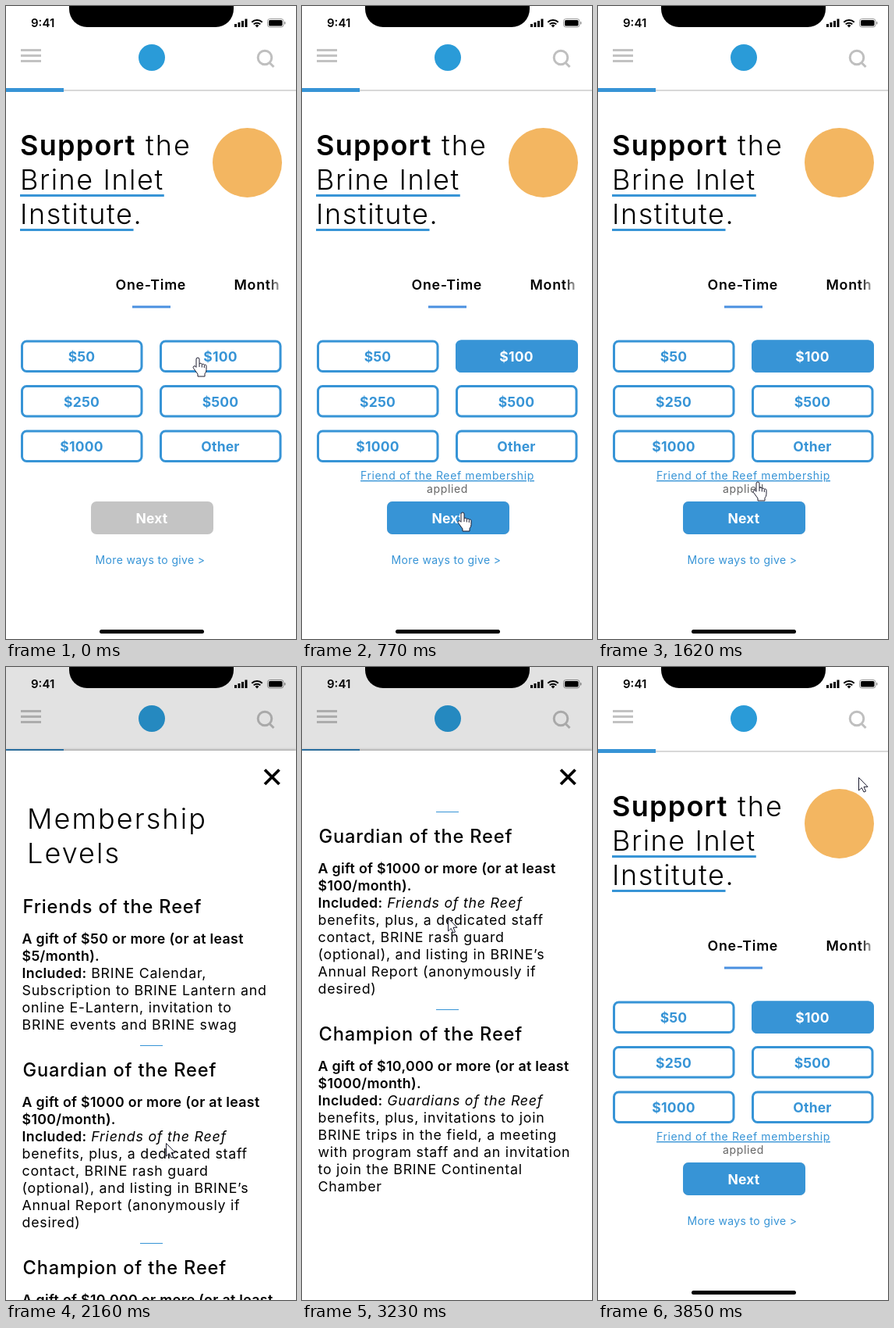
An HTML page that plays this animation: 372 px wide and 810 px high, repeating every 3930 ms.

```html
<!DOCTYPE html>
<html lang="en">
<head>
<meta charset="utf-8">
<title>Donation flow</title>
<style>
  :root { --blue: #3794d6; }
  html, body { margin: 0; width: 100%; height: 100%; overflow: hidden; background: #fff; }
  body { position: relative; font-family: Inter, "Open Sans", sans-serif; color: #000; }
  svg, .modal, .dim, .title { position: absolute; left: 0; top: 0; }
  svg { width: 372px; height: 810px; font-family: inherit; }

  h1 { margin: 0; font: 300 36px/44px Inter, "Open Sans", sans-serif; letter-spacing: .058em; white-space: pre; }
  h1 b { font-weight: 600; letter-spacing: .035em; }
  h1 u { letter-spacing: .043em; text-decoration: underline 3px var(--blue); text-underline-offset: 6px; text-decoration-skip-ink: none; }
  .title { left: 18px; top: 156px; }

  .tab { font-size: 17.8px; font-weight: 600; letter-spacing: .04em; }
  .label { font-size: 17.5px; font-weight: 700; letter-spacing: .01em; text-anchor: middle; fill: var(--blue); }
  .small { font-size: 14px; letter-spacing: .045em; text-anchor: middle; }
  .box { fill: #fff; stroke: var(--blue); stroke-width: 3; }
  .fill { fill: var(--blue); }
  .white { fill: #fff; }

  .dim { width: 372px; height: 107px; background: rgba(0, 0, 0, .115); }
  .modal { width: 372px; height: 810px; }
  .sheet { position: absolute; top: 107px; width: 372px; height: 703px; background: #fff; box-shadow: 0 -1px 3px rgba(0, 0, 0, .35); }
  .view { position: absolute; top: 172px; width: 372px; height: 638px; overflow: hidden; }
  .list { padding-left: 20.5px; }
  .list h1 { margin: 0 0 32px 6.5px; }
  h2 { margin: 0 0 0 1px; font-size: 23.6px; line-height: 29px; font-weight: 500; letter-spacing: .036em; white-space: pre; }
  p { margin: 15.5px 0 0; font-size: 17.8px; line-height: 22px; letter-spacing: .042em; white-space: pre; }
  p b { font-weight: 600; letter-spacing: .018em; }
  hr { width: 29px; height: 1px; border: 0; margin: 15.5px 0 16px 151.5px; background: var(--blue); }
</style>
</head>
<body>
<svg viewBox="0 0 372 810">
  <defs>
    <linearGradient id="fade"><stop offset="0" stop-color="#fff" stop-opacity="0"/><stop offset="1" stop-color="#fff"/></linearGradient>
  </defs>

  <!-- status bar -->
  <path d="M81 0H292V4a23 23 0 0 1-23 23H104a23 23 0 0 1-23-23Z"/>
  <text x="32" y="27" font-size="15" font-weight="600">9:41</text>
  <path d="M293 23h3v4h-3zM297.5 21h3v6h-3zM302 19h3v8h-3zM306.5 16.5h3v10.5h-3z"/>
  <path d="M315.3 20.8a9.6 9.6 0 0 1 13.4 0M317.7 23.4a6.2 6.2 0 0 1 8.6 0" fill="none" stroke="#000" stroke-width="2"/>
  <path d="M319.6 25a3.4 3.4 0 0 1 4.8 0L322 27.6z"/>
  <rect x="335.5" y="16.5" width="20.5" height="10.5" rx="3" fill="none" stroke="#999"/>
  <rect x="337" y="18" width="17.5" height="7.5" rx="1.6"/>
  <rect x="357" y="20" width="1.5" height="3.5" rx=".7" fill="#999"/>

  <!-- header -->
  <path d="M19 56.5h26M19 63.5h26M19 70.5h26" stroke="#c2c2c2" stroke-width="3"/>
  <circle cx="187" cy="66" r="17" fill="#2a9bd8"/>
  <g fill="none" stroke="#bfbfbf" stroke-width="3"><circle cx="332" cy="66" r="8.8"/><path d="M338 72.5l5.5 5.5"/></g>
  <path d="M0 108H372" stroke="#d8d8d8" stroke-width="2"/>
  <path d="M0 107.5H74" stroke="#3794d6" stroke-width="5"/>
  <circle cx="309.5" cy="200.5" r="44.5" fill="#f3b661"/>

  <!-- tabs -->
  <text class="tab" x="140.5" y="363">One-Time</text>
  <text class="tab" x="292.5" y="363">Month</text>
  <rect x="336" y="340" width="22" height="34" fill="url(#fade)"/>
  <path d="M162 385H211" stroke="#4a90e0" stroke-width="3"/>

  <g id="amounts"></g>

  <rect x="109" y="634" width="157" height="42" rx="7" fill="#c4c4c4"/>
  <text class="small fill" x="185" y="714" style="letter-spacing:.025em">More ways to give &gt;</text>
  <rect x="120" y="798" width="134" height="5" rx="2.5"/>

  <g id="chosen">
    <rect class="fill" x="197" y="427.5" width="157" height="41.5" rx="7"/>
    <text class="label white" x="275" y="455">$100</text>
    <text class="small fill" x="186.5" y="606" text-decoration="underline">Friend of the Reef membership</text>
    <text class="small" x="186.5" y="623" fill="#666">applied</text>
    <rect class="fill" x="109" y="634" width="157" height="42" rx="7"/>
  </g>
  <text class="label white" x="187" y="662">Next</text>
</svg>

<h1 class="title" id="title"><b>Support</b> the
<u>Brine Inlet</u>
<u>Institute</u>.</h1>

<div class="modal" id="modal">
  <div class="dim"></div>
  <div class="sheet"></div>
  <svg viewBox="0 0 372 810"><path d="M332 131.500l18.500 18.500M350.500 131.500l-18.500 18.500" stroke="#000" stroke-width="3.8"/></svg>
  <div class="view"><div class="list" id="list">
<h1>Membership
Levels</h1>
<h2>Friends of the Reef</h2>
<p><b>A gift of $50 or more (or at least
$5/month).
Included:</b> BRINE Calendar,
Subscription to BRINE Lantern and
online E-Lantern, invitation to
BRINE events and BRINE swag</p>
<hr>
<h2>Guardian of the Reef</h2>
<p><b>A gift of $1000 or more (or at least
$100/month).
Included:</b> <i>Friends of the Reef</i>
benefits, plus, a dedicated staff
contact, BRINE rash guard
(optional), and listing in BRINE’s
Annual Report (anonymously if
desired)</p>
<hr>
<h2>Champion of the Reef</h2>
<p><b>A gift of $10,000 or more (or at least
$1000/month).
Included:</b> <i>Guardians of the Reef</i>
benefits, plus, invitations to join
BRINE trips in the field, a meeting
with program staff and an invitation
to join the BRINE Continental
Chamber</p>
  </div></div>
</div>

<svg viewBox="0 0 372 810">
  <g id="cursor" fill="#fff" stroke="#1c1c30" stroke-linejoin="round">
    <path id="arrow" d="M.5 .5V17L4.300 13.500L7 19L9.500 18L7 12.300H12Z"/>
    <g id="hand">
      <path d="M-2 2a2 2 0 0 1 4 0v6a1.800 1.800 0 0 1 3.300 .6a1.800 1.800 0 0 1 3 .8a1.600 1.600 0 0 1 2.700 1.200v5q0 3-2 5v3.400h-9v-3l-5.500-7.500a1.700 1.700 0 0 1 2.600-2.200l.9 1z"/>
      <path d="M2 8v4M5.300 9v3.500M8.300 10v3" fill="none"/>
    </g>
  </g>
</svg>
<svg viewBox="0 0 372 810" style="mix-blend-mode:multiply"><circle id="press" r="16" fill="#faf25c"/></svg>

<script>
  const $ = id => document.getElementById(id);
  const LOOP = 3930, TICKS = 51;
  const LEAD = 8; // ms, absorbs rounding of the tick times

  $('amounts').innerHTML = ['$50', '$100', '$250', '$500', '$1000', 'Other'].map((name, i) => {
    const x = 19 + 178 * (i % 2), y = 427.5 + 57.5 * (i >> 1);
    return `<rect class="box" x="${x + 1.5}" y="${y + 1.5}" width="153.5" height="38.5" rx="6"/>
      <text class="label" x="${x + 78}" y="${y + 27.5}">${name}</text>`;
  }).join('');

  // pointer path: tick, x, y
  const path = [
    [0, 246, 450], [2, 246, 450], [6, 223, 568], [7, 214, 636], [10, 206, 648], [14, 206, 648],
    [16, 207, 641], [21, 205, 609], [32, 205, 609], [37, 211, 673], [39, 210, 380],
    [40, 138, 251], [41, 138, 251], [42, 187, 321], [48, 340, 137], [49, 340, 137], [50, 334, 141]
  ];

  const clamp = v => Math.max(0, Math.min(1, v));
  const within = (n, a, b) => n >= a && n <= b;
  const show = (id, on) => { $(id).style.display = on ? '' : 'none'; };

  function pointer(n) {
    const i = Math.max(1, path.findIndex(k => k[0] >= n));
    const [t0, x0, y0] = path[i - 1], [t1, x1, y1] = path[i];
    const k = (n - t0) / (t1 - t0);
    return [x0 + (x1 - x0) * k, y0 + (y1 - y0) * k].map(Math.round);
  }

  function draw() {
    const time = performance.now() % LOOP;
    const n = Math.floor((time + LEAD) / (LOOP / TICKS)) % TICKS;
    const place = `translate(${pointer(n)})`;
    const hand = n < 3 || within(n, 7, 27) || within(n, 47, 49);
    const open = within(n, 28, 48);

    $('chosen').setAttribute('opacity', clamp((n - 1) / 6));
    show('modal', open);
    show('title', !open);
    $('list').style.transform = `translateY(${-Math.round(299 * clamp((n - 37) / 2))}px)`;

    $('cursor').setAttribute('transform', place);
    $('press').setAttribute('transform', place);
    show('press', within(n, 37, 39));
    show('hand', hand);
    show('arrow', !hand);
    requestAnimationFrame(draw);
  }
  draw();
</script>
</body>
</html>
```
